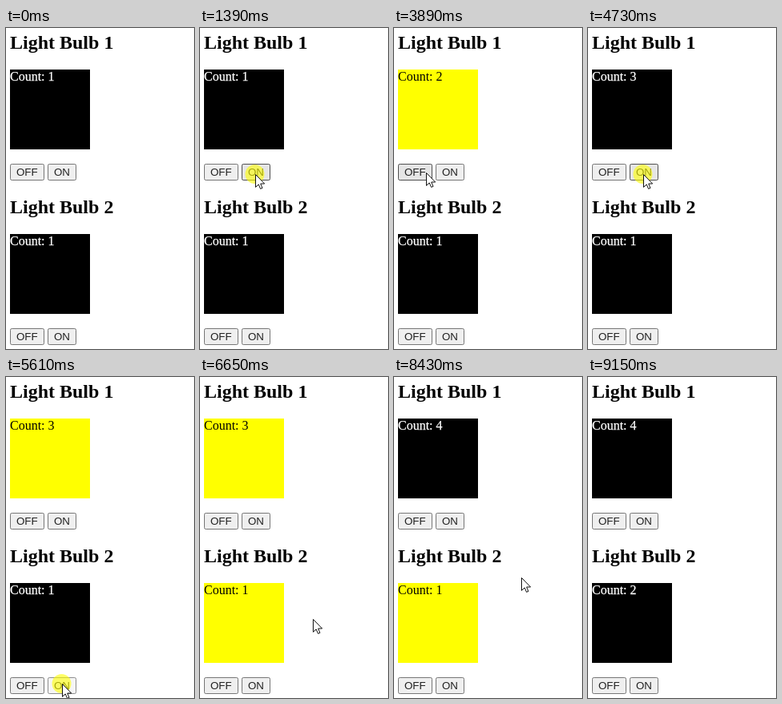
Animation of 235x402 px, one loop 9580 ms. Source, as an HTML page:

```html
<!DOCTYPE html>
<html lang="en">
<head>
<meta charset="utf-8">
<title>Light bulbs</title>
<style>
  html, body { margin: 0; width: 100%; height: 100%; overflow: hidden; background: #fff; }
  svg { display: block; width: 235px; height: 402px; }
  .title { font: bold 24px "Liberation Serif", serif; }
  .count { font: 16px "Liberation Serif", serif; stroke-width: 0.25px; }
  .label { font: 13.333px "Liberation Sans", sans-serif; fill: #222; }
</style>
</head>
<body>
<svg id="stage" viewBox="0 0 235 402"></svg>
<script>
const LOOP = 9580;
const PRESS = 80;       // how long a button looks pushed in
const REACT = 140;      // delay from press to the bulb's change
const AUTO_OFF = 2745;  // a lit bulb left alone goes out
const stage = document.getElementById('stage');

function set(el, attrs) {
  for (const key in attrs) el.setAttribute(key, attrs[key]);
}

function add(name, attrs, text) {
  const el = document.createElementNS('http://www.w3.org/2000/svg', name);
  set(el, attrs);
  if (text) el.textContent = text;
  return stage.appendChild(el);
}

function makeButton(label, x, y, width) {
  const face = add('rect', { x: x + 0.5, y: y + 0.5, width: width - 1, height: 20, rx: 1.8 });
  add('text', { class: 'label', x: x + 8, y: y + 15.4 }, label);
  return { x, y, width, face };
}

function makeBulb(number, y) {
  add('text', { class: 'title', x: 5, y: y + 26 }, 'Light Bulb ' + number);
  return {
    lamp: add('rect', { x: 5, y: y + 52, width: 100, height: 100 }),
    count: add('text', { class: 'count', x: 5, y: y + 66 }),
    buttons: [makeButton('OFF', 5, y + 170, 43), makeButton('ON', 52, y + 170, 36)]
  };
}

const bulbs = [makeBulb(1, 0), makeBulb(2, 206)];
const halo = add('circle', { r: 12, fill: '#ff0', opacity: 0.6 });
const cursor = add('path', {
  d: 'M.5 .5V16.4L4.2 12.9 6.6 18.4 9 17.4 6.7 12H11.7Z',
  fill: '#fff', stroke: '#111', 'stroke-width': 1
});

const point = (x, y) => ({ x, y });
const mix = (a, b, u) => point(a.x + (b.x - a.x) * u, a.y + (b.y - a.y) * u);
const ease = u => u * u * (3 - 2 * u);

const ENTRY = point(219, 396), CORNER = point(208, 305), EXIT = point(167, 406);
const OFF_1 = point(40, 181), ON_1 = point(69, 183), ON_2 = point(70, 384);

const clicks = [
  { leave: 590, press: 1300, to: ON_1, bulb: 0, on: true },
  { leave: 1750, press: 2160, to: OFF_1, bulb: 0, on: false },
  { leave: 2670, press: 3060, to: ON_1, bulb: 0, on: true },
  { leave: 3570, press: 3920, to: OFF_1, bulb: 0, on: false },
  { leave: 4100, press: 4600, to: ON_1, bulb: 0, on: true },
  { leave: 4770, press: 5600, to: ON_2, bulb: 1, on: true }
];

// After the last click the pointer drifts in loops before leaving.
const ROAM_START = 6730, ROAM_END = 8550;
function roam(t) {
  const turn = 2 * Math.PI * (t - 7670) / 1000;
  return point(161 - 27 * Math.cos(turn), 275 + 29 * Math.sin(turn / 1.17));
}

const legs = [
  ...clicks,
  { leave: 5780, to: CORNER },
  { leave: 6320, to: roam(ROAM_START) },
  { leave: ROAM_END, from: roam(ROAM_END), to: EXIT }
];
legs.forEach((leg, i) => {
  leg.from ??= i ? legs[i - 1].to : ENTRY;
  // Longer ways take longer
  leg.duration = 280 + 1.6 * Math.hypot(leg.to.x - leg.from.x, leg.to.y - leg.from.y);
});

function pointerAt(t) {
  if (t >= ROAM_START && t < ROAM_END) return roam(t);
  const leg = legs.findLast(l => l.leave <= t);
  return leg ? mix(leg.from, leg.to, ease(Math.min(1, (t - leg.leave) / leg.duration))) : ENTRY;
}

function bulbAt(t, index) {
  const past = clicks.filter(c => c.bulb === index && c.press + REACT <= t);
  const last = past[past.length - 1];
  const expired = last && last.on && t >= last.press + REACT + AUTO_OFF;
  return {
    lit: last && last.on && !expired,
    count: 1 + past.filter(c => !c.on).length + (expired ? 1 : 0)
  };
}

function drawButton({ x, y, width, face }, tip, pressed) {
  const hover = tip.x >= x && tip.x < x + width && tip.y >= y && tip.y < y + 21;
  const [fill, stroke] = !hover ? ['#efefef', '#767676']
    : pressed ? ['#f5f5f5', '#8d8d8d'] : ['#e5e5e5', '#4f4f4f'];
  set(face, { fill, stroke });
}

function draw(t) {
  const tip = pointerAt(t);
  const click = clicks.find(c => t >= c.press && t < c.press + REACT);
  const pressed = Boolean(click) && t < click.press + PRESS;

  bulbs.forEach((bulb, i) => {
    const { lit, count } = bulbAt(t, i);
    const ink = lit ? '#000' : '#fff';
    set(bulb.lamp, { fill: lit ? '#ff0' : '#000' });
    set(bulb.count, { fill: ink, stroke: lit ? 'none' : ink });
    bulb.count.textContent = 'Count: ' + count;
    bulb.buttons.forEach(button => drawButton(button, tip, pressed));
  });

  const x = Math.round(tip.x), y = Math.round(tip.y);
  const shown = t >= legs[0].leave && y < 402;
  cursor.style.display = shown ? '' : 'none';
  halo.style.display = click ? '' : 'none';
  set(cursor, { transform: `translate(${x} ${y})` });
  set(halo, { cx: x - 0.5, cy: y });
}

const start = performance.now();
function tick() {
  draw((performance.now() - start) % LOOP);
  requestAnimationFrame(tick);
}
tick();
</script>
</body>
</html>
```
